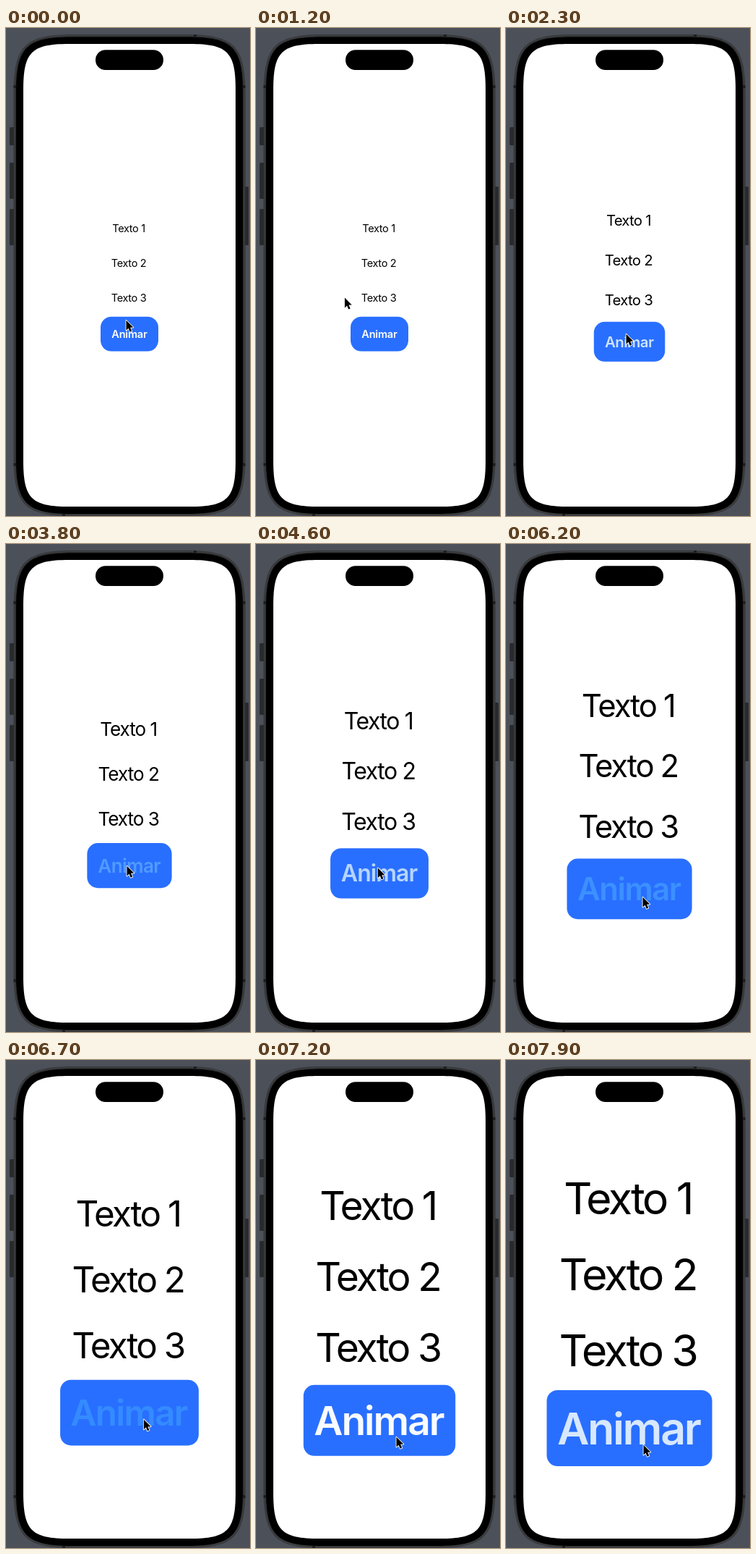
An HTML page with a canvas that plays this animation: 338x674 px, repeating every 8 s.

```html
<!DOCTYPE html>
<html lang="es">
<head>
<meta charset="utf-8">
<title>Animar</title>
<style>
html, body { margin: 0; width: 100%; height: 100%; overflow: hidden; background: #4b5059; }
canvas { display: block; width: 338px; height: 674px; }
</style>
</head>
<body>
<canvas id="stage"></canvas>
<script>
const W = 338, H = 674, LOOP = 8000;
const FONT = 'Inter, "Liberation Sans", sans-serif';
const PT = 0.75;          // pixels per point
const CX = 171;
const START_PT = 20, STEP_PT = 8;
const HOLD = 165, GROW = 400, FADE = 560, GLIDE = 600;

// Release time of each tap
const taps = [1920, 2880, 3880, 4730, 5450, 6270, 6700, 7500];

// Pointer stops: arrival time, x, y
const stops = [[0, 166, 403], [250, 196, 420], [600, 107, 354], [1600, 166, 422],
  [3500, 167, 444], [5100, 183, 478], [6000, 189, 487], [7100, 194, 520], [7900, 190, 531]];

const canvas = document.getElementById('stage');
const dpr = window.devicePixelRatio || 1;
canvas.width = W * dpr;
canvas.height = H * dpr;
const ctx = canvas.getContext('2d');

const clamp = v => Math.max(0, Math.min(1, v));
const ease = v => { v = clamp(v); return v * v * (3 - 2 * v); };
const mix = (a, b, k) => a + (b - a) * k;

function box(x, y, w, h, r, color) {
  ctx.beginPath();
  ctx.roundRect(x, y, w, h, r);
  ctx.fillStyle = color;
  ctx.fill();
}

// Rectangle with continuous-curvature corners
function smoothBox(x, y, w, h, r, color) {
  const a = r * 1.528, c = r * 0.272;
  ctx.fillStyle = color;
  ctx.beginPath();
  for (const [sx, sy] of [[1, 1], [-1, 1], [-1, -1], [1, -1]]) {
    const px = sx > 0 ? x : x + w, py = sy > 0 ? y : y + h;
    const side = [px, py + sy * a, px, py + sy * c];
    const edge = [px + sx * a, py, px + sx * c, py];
    const [from, to] = sx === sy ? [side, edge] : [edge, side];
    ctx.lineTo(from[0], from[1]);
    ctx.bezierCurveTo(from[2], from[3], to[2], to[3], to[0], to[1]);
  }
  ctx.fill();
}

const fontSize = t => taps.reduce((pt, up) => pt + STEP_PT * ease((t - up) / GROW), START_PT);

// Label fades while the button is held, then recovers
function dimming(t) {
  const up = taps.findLast(up => t >= up - HOLD);
  if (up === undefined) return 0;
  return t < up ? clamp((t - up + HOLD) / 100) : 1 - ease((t - up) / FADE);
}

function pointerAt(t) {
  const i = stops.findLastIndex(s => t >= s[0]);
  const a = stops[i], b = stops[i + 1] || a;
  const k = ease(1 - (b[0] - t) / Math.min(GLIDE, b[0] - a[0] || 1));
  return [mix(a[1], b[1], k), mix(a[2], b[2], k)];
}

function label(str, x, y, px, weight, tracking, color) {
  const size = px * 0.968;
  const gap = size * tracking;
  ctx.font = `${weight} ${size}px ${FONT}`;
  ctx.letterSpacing = gap + 'px';
  ctx.textAlign = 'center';
  ctx.fillStyle = color;
  ctx.fillText(str, x + gap / 2, y + px * 0.3525);
}

function drawPhone() {
  ctx.fillStyle = '#4b5059';
  ctx.fillRect(0, 0, W, H);
  for (const [y, h] of [[137, 25], [186, 50], [250, 50]]) box(5, y, 7, h, 1.5, '#292a2c');
  box(330, 219, 6, 81, 1.5, '#292a2c');
  smoothBox(10.5, 9, 321, 665, 55, '#303133');
  smoothBox(11.5, 10, 319, 663, 54, '#454648');
  smoothBox(12.5, 11, 317, 661, 53, '#2a2b2c');
  ctx.fillStyle = '#1c1d1e';
  for (const y of [79, 601]) {
    ctx.fillRect(10.5, y, 3.5, 4);
    ctx.fillRect(328, y, 3.5, 4);
  }
  ctx.fillRect(260, 9, 4, 3);
  ctx.fillRect(78, 671, 4, 3);
  smoothBox(14, 12.5, 314, 658.5, 51, '#000');
  smoothBox(24, 22, 294, 639, 41.25, '#fff');
  box(124, 30.3, 94, 27.7, 13.85, '#000');
}

function drawContent(t) {
  const pt = fontSize(t), px = pt * PT;
  const row = 30 + px * 1.193;
  const width = 80 + (pt - START_PT) * 2.33;
  const mid = 350.8 + row * 1.5;
  const grow = Math.sqrt((pt - START_PT) / (STEP_PT * taps.length));

  for (let i = 1; i <= 3; i++) {
    label('Texto ' + i, CX - 0.8, mid - 2.4 - row * (4 - i), px, 400, mix(-0.023, -0.056, grow), '#000');
  }
  box(CX - width / 2, mid - row / 2, width, row, 15, '#296fff');
  const dim = dimming(t);
  const color = `rgb(${mix(255, 52, dim)},${mix(255, 139, dim)},255)`;
  label('Animar', CX, mid, px, 600, mix(-0.015, -0.038, grow), color);
}

const arrow = new Path2D('M.5 .8V14.6L3.6 11.7L5.7 16.7L8.2 15.6L6.1 10.8L10.3 10.6Z');

function drawPointer(t) {
  ctx.save();
  ctx.translate(...pointerAt(t));
  ctx.lineJoin = 'round';
  ctx.lineWidth = 1.8;
  ctx.strokeStyle = '#fff';
  ctx.stroke(arrow);
  ctx.fillStyle = '#000';
  ctx.fill(arrow);
  ctx.restore();
}

const start = performance.now();
function draw() {
  const t = Math.max(0, performance.now() - start) % LOOP;
  ctx.setTransform(dpr, 0, 0, dpr, 0, 0);
  drawPhone();
  drawContent(t);
  drawPointer(t);
  requestAnimationFrame(draw);
}
draw();
</script>
</body>
</html>
```
